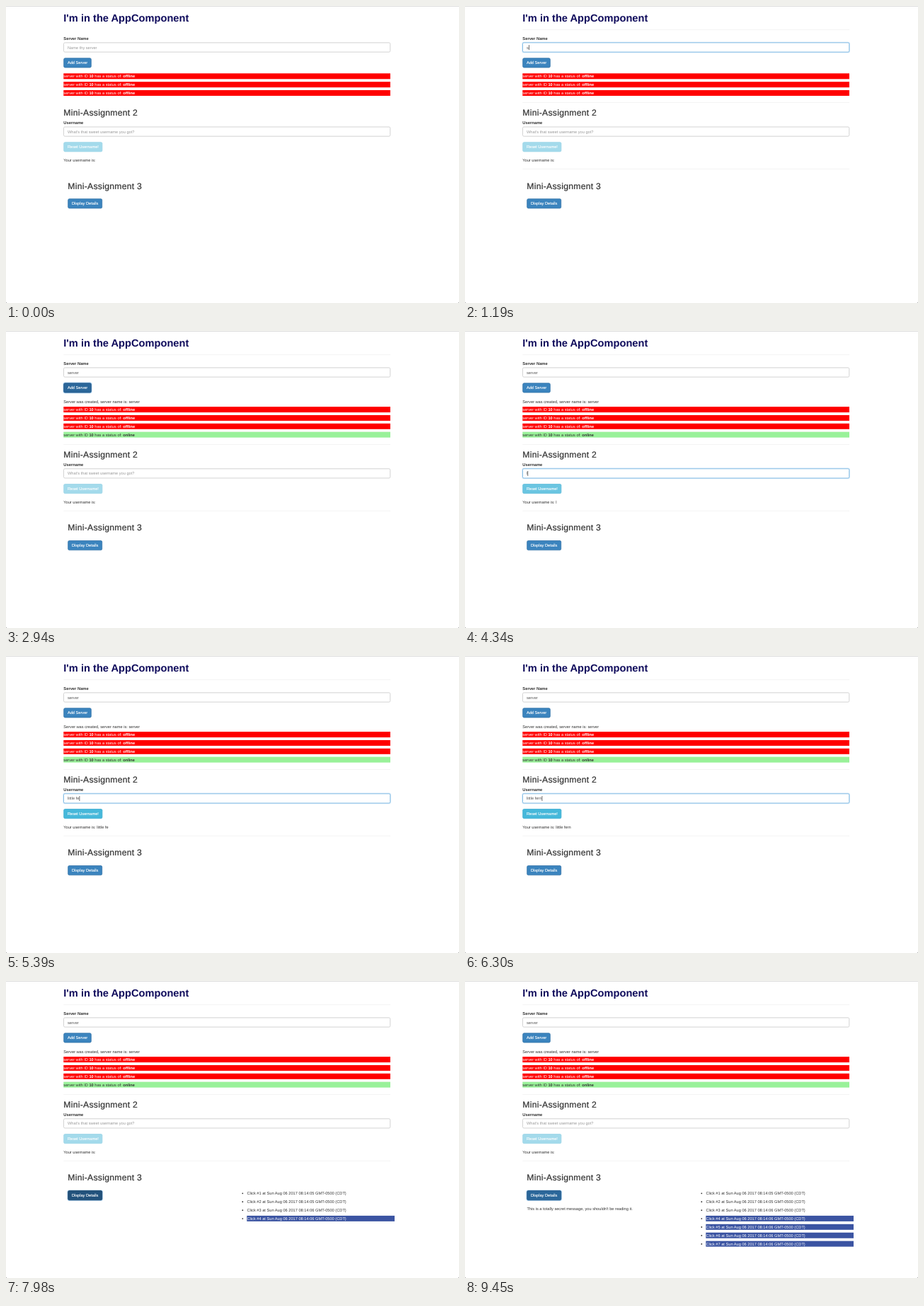
Write an HTML page with a canvas that moves like this. It is 640 px wide and 420 px high and loops after 9520 ms.

```html
<!DOCTYPE html>
<html lang="en">
<head>
<meta charset="utf-8">
<title>AppComponent demo</title>
<style>
html, body { margin: 0; width: 100%; height: 100%; overflow: hidden; background: #fff; }
canvas { display: block; width: 640px; height: 420px; }
</style>
</head>
<body>
<canvas id="stage" width="640" height="420"></canvas>
<script>
const ctx = document.getElementById('stage').getContext('2d');
ctx.textRendering = 'geometricPrecision';

const LOOP = 9520, STEP = 70;
const LEFT = 81.3, WIDTH = 461.7, BODY = 5.66, ROW = 11.85;
const FAMILY = '"Liberation Sans", Arial, sans-serif';
const INK = '#333';

const USERNAME = 'little fern';
const AT = {
  serverFocus: 700, serverType: 1120, addHover: 2170, addPress: 2310, added: 2380,
  addLeave: 3290, userFocus: 3710, userType: 4270, resetPress: 6580, reset: 6650,
  detailsHover: 6930
};
const CLICKS = [7140, 7350, 7560, 7770, 8050, 8260, 8470];

const BLUE = { fill: '#3b84be', edge: '#3474a9' };
const BLUE_HOVER = { fill: '#2b679a', edge: '#235583' };
const BLUE_PRESS = { fill: '#22527c', edge: '#1b4265' };

const mix = (a, b, k) => `rgb(${a.map((v, i) => Math.round(v + (b[i] - v) * k))})`;
const clamp = v => Math.max(0, Math.min(1, v));
const typed = (word, t, start, gap) =>
  t < start ? '' : word.slice(0, 1 + Math.floor((t - start) / gap));

function text(str, x, y, { size = BODY, weight = 400, color = INK, spacing = 0, stroke = 0 } = {}) {
  ctx.font = `${weight} ${size}px ${FAMILY}`;
  ctx.letterSpacing = spacing + 'px';
  ctx.fillStyle = color;
  ctx.fillText(str, x, y);
  if (stroke) {
    ctx.strokeStyle = color;
    ctx.lineWidth = stroke;
    ctx.strokeText(str, x, y);
  }
  return x + ctx.measureText(str).width;
}

function rect(x, y, w, h, color) {
  ctx.fillStyle = color;
  ctx.fillRect(x, y, w, h);
}

function box(x, y, w, h, fill, edge, glow) {
  ctx.beginPath();
  ctx.roundRect(x, y, w, h, 1.7);
  if (glow) {
    ctx.strokeStyle = glow;
    ctx.lineWidth = 2.4;
    ctx.stroke();
  }
  ctx.fillStyle = fill;
  ctx.fill();
  ctx.strokeStyle = edge;
  ctx.lineWidth = 0.8;
  ctx.stroke();
}

const rule = (x, y) => rect(x, y, LEFT + WIDTH - x, 1, '#f4f4f4');

const subtitle = (str, x, y) => text(str, x, y, { size: 12.2, spacing: 0.27, stroke: 0.22 });

function input(y, value, hint, focused, caret) {
  box(LEFT + 0.2, y + 0.4, WIDTH - 0.4, 13.2, '#fff',
    focused ? '#6fb0df' : '#c8c8c8', focused && 'rgba(102,175,233,.3)');
  const end = text(value || hint, 87, y + 9, { color: value ? '#555' : '#999' });
  if (focused && caret) rect(value ? end + 0.2 : 87, y + 3.6, 0.7, 7, '#333');
}

function button(label, x, y, w, style, focused) {
  box(x + 0.4, y + 0.4, w - 0.8, 13.2, style.fill, style.edge,
    focused && 'rgba(120,185,235,.6)');
  text(label, x + 5.6, y + 8.9, { color: '#fff', stroke: 0.12 });
}

function server(y, online) {
  const color = online ? INK : '#fff', status = online ? 'online' : 'offline';
  rect(LEFT, y, WIDTH, 8, online ? '#99f199' : '#ff0000');
  let x = text('server with ID ', LEFT, y + 6, { color });
  x = text('10', x, y + 6, { color, weight: 700 });
  x = text(' has a status of: ', x, y + 6, { color });
  text(status, x, y + 6, { color, weight: 700 });
}

function clickRow(i) {
  const y = 302.1 + i * 11.93, marked = i > 2;
  if (marked) rect(340.3, y - 6, 208.7, 8, '#3b54a2');
  ctx.beginPath();
  ctx.arc(334.3, y - 1.8, 0.9, 0, Math.PI * 2);
  ctx.fillStyle = INK;
  ctx.fill();
  text(`Click #${i + 1} at Sun Aug 06 2017 08:14:0${i < 2 ? 5 : 6} GMT-0500 (CDT)`,
    340.5, y, { color: marked ? '#fff' : INK });
}

function serverSection(t) {
  const name = typed('server', t, AT.serverType, 140);
  const added = t >= AT.added;
  text('Server Name', LEFT, 47.9, { weight: 700, size: 5.8 });
  input(51.5, name, 'Name thy server',
    t >= AT.serverFocus && t < AT.addPress, t >= AT.serverType || t % 1000 < 850);

  const hover = t >= AT.addHover && t < AT.addLeave;
  const pressed = t >= AT.addPress && t < AT.added;
  button('Add Server', LEFT, 73.4, 39.4, pressed ? BLUE_PRESS : hover ? BLUE_HOVER : BLUE,
    t >= AT.addPress && t < AT.userFocus);

  if (added) text('Server was created, server name is: server', LEFT, 101.5);
  const top = added ? 107.1 : 95.3;
  for (let i = 0; i < (added ? 4 : 3); i++) server(top + i * ROW, i === 3);
}

function userSection(t, dy) {
  const name = t < AT.reset ? typed(USERNAME, t, AT.userType, 140) : '';
  const focused = t >= AT.userFocus && t < AT.resetPress;
  subtitle('Mini-Assignment 2', LEFT, 155.2 + dy);
  text('Username', LEFT, 166.9 + dy, { weight: 700, size: 5.8 });
  input(170.6 + dy, name, "What's that sweet username you got?", focused,
    (t - AT.userType + 9000) % 1000 < 500);

  const on = name ? clamp((t - AT.userType + 70) / 230) : 0;
  const pressed = t >= AT.resetPress && t < AT.reset;
  button('Reset Username!', LEFT, 192.3 + dy, 55, {
    fill: pressed ? '#31a5c8' : mix([163, 218, 235], [70, 184, 218], on),
    edge: mix([158, 214, 232], [62, 174, 210], on)
  }, pressed);
  text('Your username is: ' + name, LEFT, 220.2 + dy);
}

function detailsSection(t, dy) {
  const count = CLICKS.filter(c => t >= c).length;
  const pressed = CLICKS.some(c => t >= c - 70 && t < c);
  subtitle('Mini-Assignment 3', 87.3, 258.5 + dy);
  button('Display Details', 87.3, 272.4 + dy, 48.8,
    pressed ? BLUE_PRESS : t >= AT.detailsHover ? BLUE_HOVER : BLUE,
    t >= CLICKS[0] - 70);
  if (count % 2) text("This is a totally secret message, you shouldn't be reading it.", 87.4, 324.1);
  for (let i = 0; i < count; i++) clickRow(i);
}

function draw(t) {
  const dy = t >= AT.added ? 23.8 : 0;
  rect(0, 0, 640, 420, '#fff');
  rect(0, 0, 640, 1, '#dedede');
  for (const x of [0, 639]) rect(x, 419, 1, 1, '#aaa');

  text("I'm in the AppComponent", LEFT, 22.3, { size: 14.65, weight: 700, color: '#100c5c' });
  if (t >= STEP) {
    rule(LEFT, 33);
    rule(LEFT, Math.round(136 + dy));
    rule(LEFT, Math.round(230 + dy));
  }
  serverSection(t);
  userSection(t, dy);
  detailsSection(t, dy);
}

function tick(now) {
  const t = now % LOOP;
  draw(Math.floor(t / STEP) * STEP);
  requestAnimationFrame(tick);
}

draw(0);
requestAnimationFrame(tick);
</script>
</body>
</html>
```
